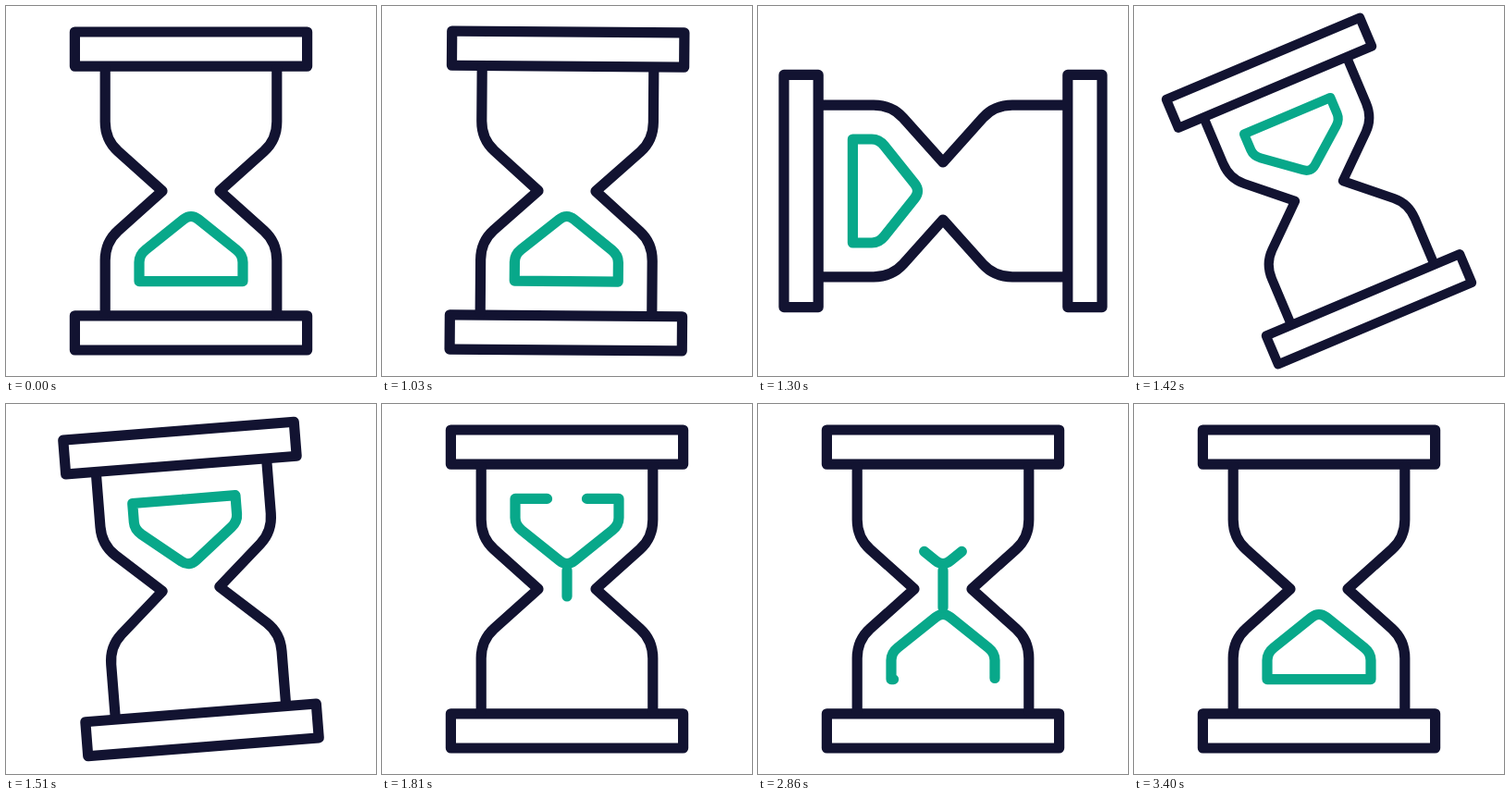
Write an HTML page that moves like this. It is 400 by 400 pixels and loops after 3430 ms.

```html
<!DOCTYPE html>
<html lang="en">
<head>
<meta charset="utf-8">
<title>Hourglass</title>
<style>
  html, body { margin: 0; width: 100%; height: 100%; overflow: hidden; background: #fff; }
  svg { display: block; width: 100%; height: 100%; }
</style>
</head>
<body>
<svg viewBox="0 0 400 400" fill="none" stroke="#121331" stroke-width="11.2" stroke-linecap="round" stroke-linejoin="round">
  <defs>
    <path id="side" d="M107.2 68V125C107.2 137 112 148.9 121 157L169 200L121 243C112 251.1 107.2 263 107.2 275V332"/>
    <path id="sand" pathLength="100" d="M200 227.5Q204 227.5 208 230.7L249 263.5Q256 269.1 256 277V297.6H144V277Q144 269.1 151 263.5L192 230.7Q196 227.5 200 227.5"/>
  </defs>
  <g id="glass">
    <rect x="74.4" y="28" width="251.2" height="37.2"/>
    <rect x="74.4" y="334.8" width="251.2" height="37.2"/>
    <use href="#side"/>
    <use href="#side" transform="matrix(-1 0 0 1 400 0)"/>
    <g stroke="#08a88a">
      <use id="lower" href="#sand"/>
      <use id="upper" href="#sand" transform="rotate(180 200 200)"/>
      <path id="stream"/>
    </g>
  </g>
</svg>
<script>
const LOOP = 3430, STEP = 30;
const TURN = 1000, SIDEWAYS = 1300, POUR = 1600, LAND = 1900, EMPTY = 3100, DONE = 3400;
const [glass, lower, upper, stream] =
  ['glass', 'lower', 'upper', 'stream'].map(id => document.getElementById(id));

const progress = (t, from, to) => Math.min(1, Math.max(0, (t - from) / (to - from)));

// cubic-bezier(.6, 0, .4, 1)
function ease(x) {
  let lo = 0, hi = 1;
  for (let i = 0; i < 30; i++) {
    const s = (lo + hi) / 2, r = 1 - s;
    if (1.8 * s * r * r + 1.2 * s * s * r + s ** 3 < x) lo = s; else hi = s;
  }
  return lo * lo * (3 - 2 * lo);
}

// Shows a percentage of the outline, spreading both ways from its tip.
function trim(shape, amount, shift = 0) {
  shape.style.visibility = amount > 0 ? 'visible' : 'hidden';
  shape.style.strokeDasharray = `${amount} ${100 - amount}`;
  shape.style.strokeDashoffset = amount / 2 + shift;
}

// The glass shrinks on the diagonals and is full size upright and sideways.
function scaleAt(t) {
  const away = Math.abs(t - SIDEWAYS);
  return 1 - 0.115 * (ease(progress(away, 0, 60)) - ease(progress(away, 60, 240)));
}

function draw(time) {
  const t = TURN + Math.floor((time - TURN) / STEP) * STEP;
  const pouring = t >= POUR;
  const angle = pouring ? 0 : 180 * ease(progress(t, TURN, POUR));
  glass.setAttribute('transform',
    `translate(200 200) rotate(${angle}) scale(${scaleAt(t)}) translate(-200 -200)`);

  trim(lower, pouring ? 100 * progress(t, LAND, DONE) : 100, 0.6);
  trim(upper, pouring ? 100 * (1 - progress(t, POUR, EMPTY)) : 0);

  const top = 180 + 40 * progress(t, EMPTY, DONE);
  const bottom = 180 + 40 * progress(t, POUR, LAND);
  stream.setAttribute('d', bottom > top ? `M200 ${top}V${bottom}` : '');
}

const start = performance.now();
function tick() {
  draw((performance.now() - start) % LOOP);
  requestAnimationFrame(tick);
}
tick();
</script>
</body>
</html>
```
